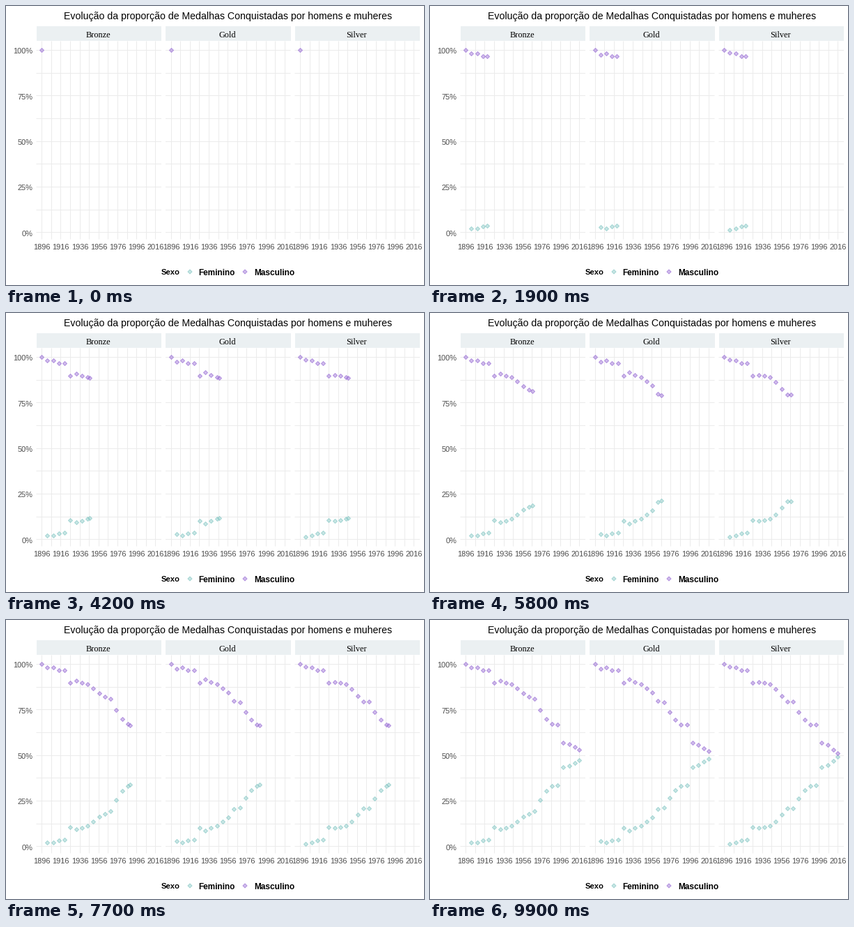
Animation, 600 px wide and 400 px high, one loop 10 s. Source, as a matplotlib script:

```python
import numpy as np
import matplotlib.pyplot as plt
from matplotlib.animation import FuncAnimation
from matplotlib.collections import PolyCollection
from matplotlib.colors import to_rgba
from matplotlib.patches import Rectangle

W, H, DPI = 600, 400, 100
PX = 72 / DPI
FRAMES, TRAIL_STEP = 100, 5
FIRST, LAST, WOMEN_FROM = 1896, 2016, 1900

# Women's share of the medals: key points of the common curve
CURVE = [(1896, 0), (1900, 2.1), (1908, 1.9), (1912, 3.2), (1920, 3.4),
         (1924, 5.9), (1928, 13.5), (1932, 9.3), (1946, 11.2), (1964, 20.4),
         (1972, 20.5), (1976, 28.8), (1980, 31), (1984, 29.8), (1988, 34.4),
         (1992, 32.2), (1996, 37), (2000, 45.4), (2004, 44), (2016, 48)]
# How each medal departs from it: (year, height, width)
BUMPS = {
    "Bronze": [(1964, -2, 6), (1976, -0.9, 6), (2014, -0.8, 8)],
    "Gold": [(1902, 0.6, 4), (1932, -0.8, 4), (1956, -1.1, 4),
             (1966, 0.8, 9)],
    "Silver": [(1902, -0.7, 4), (1932, 0.7, 4), (1960, 1.1, 6),
               (2016, 1, 6)],
}

PANEL_X, PANEL_W, PITCH = 43.5, 179.5, 185.5
PANEL_TOP, PANEL_BOTTOM = 50.5, 334.5
GRID, STRIP, TICK = "#EBEBEB", "#EBF0F2", "#4D4D4D"
TEAL, PURPLE = "#88C9C6", "#9B6FD6"
DIAMOND = 3 * np.array([(0, -1), (1, 0), (0, 1), (-1, 0)])


def women_share(years, medal):
    share = np.interp(years, *zip(*CURVE))
    for year, height, width in BUMPS[medal]:
        share = share + height * np.exp(-((years - year) / width) ** 2)
    return share


def x_at(year, panel):
    return PANEL_X + panel * PITCH + PANEL_W * (1 / 22 + (year - FIRST) / 132)


def y_at(pct):
    return 324.7 - 2.612 * pct


def pixel(v):
    return np.floor(v) + 0.5


def label(x, y, s, px, color="black", ha="center", family="Liberation Sans",
          weight="normal"):
    ax.text(x, y, s, fontsize=px * PX, color=color, ha=ha, va="baseline",
            family=family, weight=weight)


def diamonds(x, y):
    centers = np.column_stack([pixel(x), pixel(y)])
    return centers[:, None] + DIAMOND


def marks(color, verts=()):
    return ax.add_collection(
        PolyCollection(verts, facecolors=[to_rgba(color, 0.45)],
                       edgecolors=[to_rgba(color, 0.7)], linewidths=PX,
                       zorder=3), autolim=False)


def grid_line(xs, ys):
    ax.plot(xs, ys, color=GRID, lw=PX, snap=False, zorder=1,
            solid_capstyle="butt")


fig = plt.figure(figsize=(W / DPI, H / DPI), dpi=DPI, facecolor="white")
ax = fig.add_axes([0, 0, 1, 1])
ax.set_xlim(0, W)
ax.set_ylim(H, 0)
ax.axis("off")

label(318.5, 19, "Evolução da proporção de Medalhas Conquistadas "
      "por homens e muheres", 14.1)

for p, medal in enumerate(BUMPS):
    left = PANEL_X + p * PITCH
    ax.add_patch(Rectangle((left, 29), PANEL_W, 21, color=STRIP, lw=0))
    label(left + PANEL_W / 2 - 1, 45, medal, 12.2, family="Liberation Serif")
    for pct in np.arange(0, 101, 12.5):
        grid_line([left, left + PANEL_W], [pixel(y_at(pct))] * 2)
    for year in range(FIRST, LAST + 1, 10):
        x = pixel(x_at(year, p))
        grid_line([x, x], [PANEL_TOP, PANEL_BOTTOM])
        if (year - FIRST) % 20 == 0:
            label(x, 349, str(year), 11, TICK)

for pct in range(0, 101, 25):
    label(38.5, y_at(pct) + 5, f"{pct}%", 11, TICK, ha="right")

label(222.5, 385, "Sexo", 11.3, ha="left", weight="bold")
label(276.5, 385.5, "Feminino", 11.8, ha="left", weight="bold")
label(356.5, 385.5, "Masculino", 11.9, ha="left", weight="bold")
marks(TEAL, diamonds([263], [380]))
marks(PURPLE, diamonds([342], [380]))

women, men = marks(TEAL), marks(PURPLE)


def update(frame):
    # One mark every few frames stays behind the moving point
    steps = np.append(np.arange(0, frame, TRAIL_STEP), frame)
    years = FIRST + (LAST - FIRST) * steps / (FRAMES - 1)
    seen = years >= WOMEN_FROM
    women_verts, men_verts = [], []
    for p, medal in enumerate(BUMPS):
        share = women_share(years, medal)
        x = x_at(years, p)
        men_verts.extend(diamonds(x, y_at(100 - share)))
        women_verts.extend(diamonds(x[seen], y_at(share[seen])))
    women.set_verts(women_verts)
    men.set_verts(men_verts)
    return women, men


anim = FuncAnimation(fig, update, frames=FRAMES, interval=100, repeat=True,
                     repeat_delay=0, blit=False)
plt.show()
```
